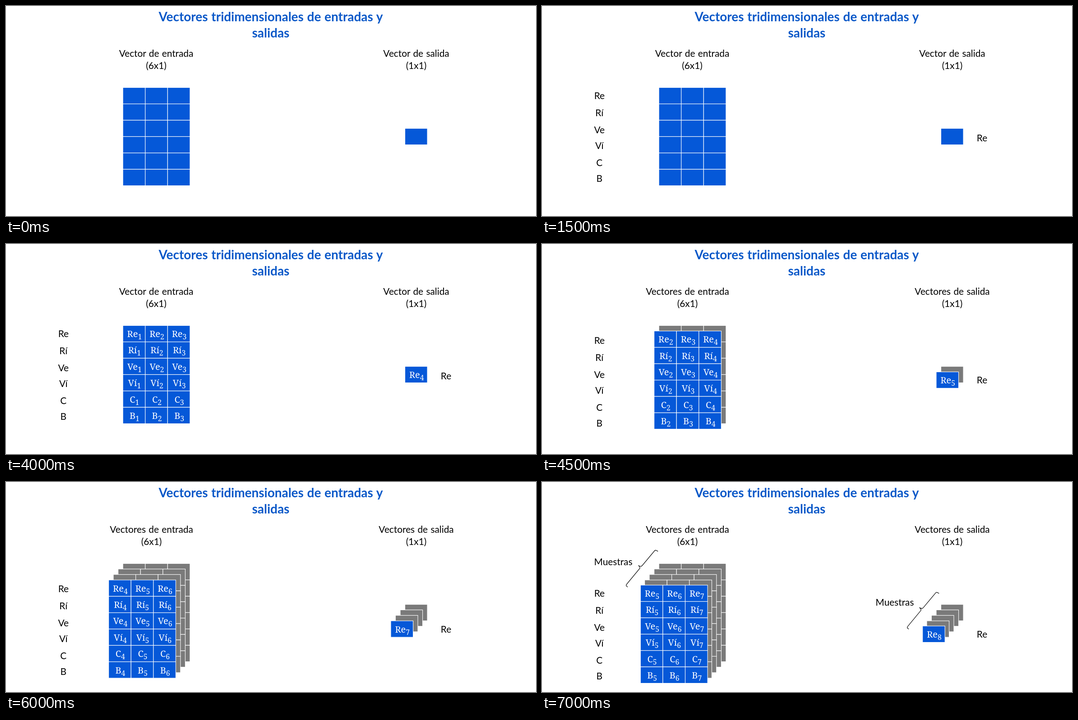
Animation, 1175 px wide and 467 px high, one loop 8 s. Source, as an HTML page:

```html
<!DOCTYPE html>
<html lang="es">
<head>
<meta charset="utf-8">
<title>Vectores tridimensionales</title>
<style>
  html, body { margin: 0; width: 100%; height: 100%; overflow: hidden; background: #fff; }
  svg { display: block; width: 100%; height: 100%; }
  text { font: 20.8px Lato, Carlito, sans-serif; word-spacing: 1px; text-anchor: middle; fill: #000; }
  .title { font-size: 27.95px; font-weight: 700; fill: #0a58c8; }
  .math { font: 20px "Noto Serif", serif; fill: #fff; }
  .sub { font-size: 15.8px; }
  rect { stroke: #fff; stroke-width: 1.1; }
  path { fill: none; stroke: #222; stroke-width: 1.4; }
</style>
</head>
<body>
<svg id="stage" viewBox="0 0 1175 467"></svg>
<script>
const LOOP = 8000;
const STARTS = [0, 500, 1500, 2500, 3000, 3500, 4000, 4500, 5500, 6000, 6500, 7000];
const BLUE = '#0558d8', GRAY = '#7a7a7a';
const CELL_W = 49.6, CELL_H = 36.37;

const SYMBOLS = ['Re', 'Rí', 'Ve', 'Ví', 'C', 'B'];
const NAMES = ['Rentabilidad empresa', 'Rentabilidad índice', 'Volatilidad empresa',
  'Volatilidad índice', 'Correlación', 'Beta'];
const LABEL_Y = [207, 245, 283, 318, 356, 391];

// Offsets of each sample layer and of the labels beside it.
const LAYERS = [[0, 0], [-10.5, 12.2], [-21.1, 24.4], [-31.5, 36.6], [-40.8, 48]];
const INPUT_SHIFT = [0, 14.5, 24, 37.7, 48.2];
const OUTPUT_SHIFT = [0, 9.5, 19.8, 34, 45];

const stage = document.getElementById('stage');

const text = (x, y, content, cls = '') => `<text x="${x}" y="${y}" class="${cls}">${content}</text>`;

const indexed = (x, y, symbol, index) =>
  text(x, y, `${symbol}<tspan class="sub" dy="5">${index}</tspan>`, 'math');

function grid(left, top, columns, rows, color, content) {
  let out = '';
  for (let r = 0; r < rows; r++)
    for (let c = 0; c < columns; c++) {
      const x = left + c * CELL_W, y = top + r * CELL_H;
      out += `<rect x="${x}" y="${y}" width="${CELL_W}" height="${CELL_H}" fill="${color}"/>`;
      out += content(x + CELL_W / 2 + 1, y + CELL_H / 2 + 7.6, r, c);
    }
  return out;
}

// Stack of layers: gray ones behind, a blue one in front.
function stack(left, top, columns, rows, front, content) {
  return LAYERS.slice(0, front + 1).map(([dx, dy], k) =>
    grid(left + dx, top + dy, columns, rows,
      k === front ? BLUE : GRAY, k === front ? content : () => '')).join('');
}

const samples = (textX, textY, braceX, braceY) => text(textX, textY, 'Muestras')
  + `<path transform="translate(${braceX} ${braceY})"
  d="M257 154.5Q252 150 249.5 153L222 186Q219 189.5 213.5 185.5Q219 190 216 193L188 227Q184.5 231 190 233.5"/>`;

function draw(step) {
  const front = Math.min(4, Math.max(0, step - 6));
  const filled = Math.min(3, Math.max(0, step - 2));
  const noun = front ? 'Vectores' : 'Vector';

  let out = text(587, 34, 'Vectores tridimensionales de entradas y', 'title')
    + text(587, 70, 'salidas', 'title');

  const inputX = front ? 322.5 : 333;
  out += text(inputX, 113, `${noun} de entrada`) + text(inputX, 140, '(6x1)');
  out += text(909.5, 113, `${noun} de salida`) + text(909.5, 140, '(1x1)');

  out += stack(259.1, 181.3, 3, 6, front, (x, y, r, c) =>
    c < filled ? indexed(x, y, SYMBOLS[r], front + c + 1) : '');
  out += stack(884.5, 272.2, 1, 1, front, (x, y) =>
    step >= 6 ? indexed(x, y, 'Re', front + 4) : '');

  if (step === 1) {
    out += NAMES.map((name, i) => text(117, LABEL_Y[i], name)).join('');
    out += text(1060, 300.5, NAMES[0]);
  } else if (step > 1) {
    out += SYMBOLS.map((s, i) => text(127.3, LABEL_Y[i] + INPUT_SHIFT[front], s)).join('');
    out += text(975.5, 300.5 + OUTPUT_SHIFT[front], 'Re');
  }

  if (step === 11) out += samples(158, 185, 0, 0) + samples(782, 275, 623.2, 93.6);
  stage.innerHTML = out;
}

let shown = -1;
function tick() {
  const t = performance.now() % LOOP;
  const step = STARTS.filter(start => start <= t).length - 1;
  if (step !== shown) draw(shown = step);
  requestAnimationFrame(tick);
}
tick();
</script>
</body>
</html>
```
